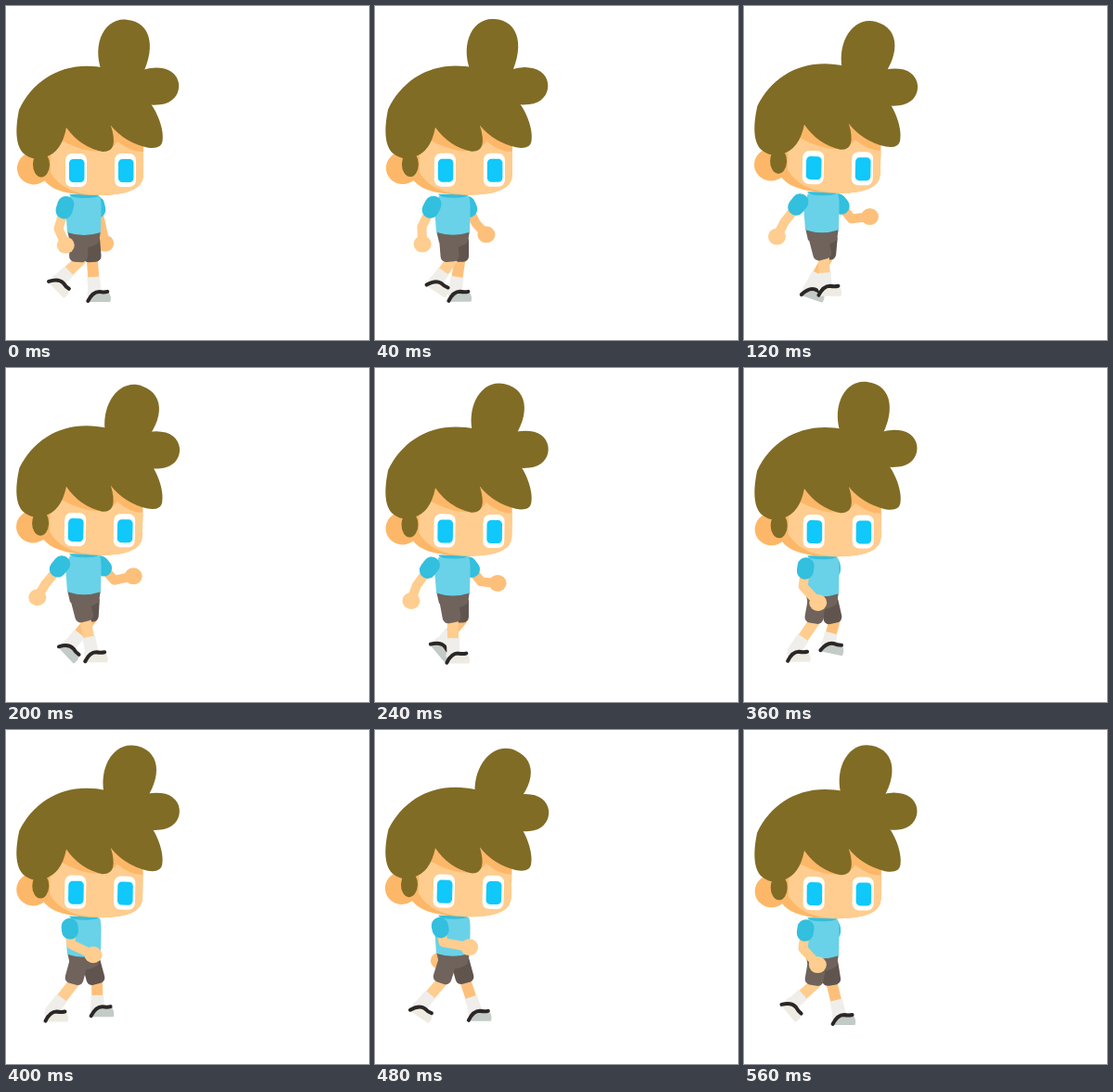
These frames come from a looping animation (391 px wide and 360 px high, 0.6 s). An HTML page with a canvas:

```html
<!DOCTYPE html>
<html>
<head>
<meta charset="utf-8">
<style>
  html, body { margin: 0; width: 100%; height: 100%; overflow: hidden; background: #fff; }
  canvas { display: block; }
</style>
</head>
<body>
<canvas id="stage" width="391" height="360"></canvas>
<script>
const ctx = document.getElementById('stage').getContext('2d');
const LOOP = 600, STEP = 40;

const HAIR = '#816c25', SKIN = '#fecd8f', SHADE = '#fdb768', FAR_SKIN = '#fdc07b';
const SHIRT = '#69d2e8', SLEEVE = '#33bfde', SOCK = '#efeeea', BLACK = '#2b2726';
const NEAR_SHORTS = '#6f635c', FAR_SHORTS = '#60544e';

const shape = {
  hair: new Path2D('M108 67C64 58 30 78 14 112C10 132 10 150 19 159Q30 168 42 163Q60 158 65 131Q80 152 104 157Q122 158 113 129Q128 147 152 152.5Q167 155 168.5 146C171 133 162 112 154 103L140 70Z'),
  tuft: new Path2D('M-18 0C-34 -28-24 -62 2 -62C30 -62 38 -32 20 4Z'),
  lobe: new Path2D('M130 76Q150 64 166 66C193 68 193 103 166 105.5Q155 107 148 104Z'),
  face: new Path2D('M40 150V186C48 199 68 204 100 204Q148 204 148 182V130H60Z'),
  light: new Path2D('M48 180V158Q49 147 62 146C85 158 110 162 120 146Q135 158 148 157V182Q148 204 100 204Q62 203 48 180Z'),
  shirt: new Path2D('M69 205H101Q103 210 102.5 222L102 244Q84 250 66 244L64 216Z'),
  collar: new Path2D('M68 203H101Q100 207 84 207Q70 207 68 203Z'),
  waist: new Path2D('M66 242H102L100 255Q85 266 69 255Z'),
  sole: new Path2D('M-10 6Q-5 -4 1 -4Q7 -3 11 -5Q15 1 13 6Z'),
  band: new Path2D('M-11 5Q-6 -5 1 -5Q6 -4 10 -5')
};

let phase = 0;

// Cosine of the walk cycle: peak in degrees, n cycles per loop
const wave = (peak, n = 1) => Math.cos(n * phase - peak * Math.PI / 180);
const mix = (a, b, k) => [a[0] + (b[0] - a[0]) * k, a[1] + (b[1] - a[1]) * k];

function fill(path, color) {
  ctx.fillStyle = color;
  ctx.fill(path);
}

function oval(x, y, rx, ry, color) {
  const path = new Path2D();
  path.ellipse(x, y, rx, ry, 0, 0, 7);
  fill(path, color);
}

function box(x, y, w, h, radius, color) {
  const path = new Path2D();
  path.roundRect(x, y, w, h, radius);
  fill(path, color);
}

function line(color, width, cap, ...points) {
  ctx.strokeStyle = color;
  ctx.lineWidth = width;
  ctx.lineCap = cap;
  ctx.lineJoin = 'round';
  ctx.beginPath();
  points.forEach(p => ctx.lineTo(...p));
  ctx.stroke();
}

function placed(x, y, degrees, draw) {
  ctx.save();
  ctx.translate(x, y);
  ctx.rotate(degrees * Math.PI / 180);
  draw();
  ctx.restore();
}

// The hand swings around its rest point and the elbow follows it
function drawArm(skin, shoulder, rest, swing, rise) {
  const hand = [rest[0] + swing, rest[1] - rise];
  const elbow = [rest[0] - 6 + swing * .46, rest[1] - 17 - Math.abs(swing) * .3];
  line(skin, 10, 'round', shoulder, elbow, hand);
  oval(...hand, 9.5, 9, skin);
  line(SLEEVE, 18, 'round', shoulder, mix(shoulder, elbow, .25));
}

function drawLeg(skin, cloth, soleColor, hip, knee, foot, turn) {
  const a = turn * Math.PI / 180, c = Math.cos(a), s = Math.sin(a);
  const ankle = [foot[0] - 4 * c + 6 * s, foot[1] - 4 * s - 6 * c];
  line(skin, 12, 'butt', mix(knee, ankle, -.2), mix(knee, ankle, .7));
  line(SOCK, 14, 'butt', mix(knee, ankle, .52), mix(knee, ankle, 1.1));
  placed(...foot, turn, () => {
    oval(-3, -3, 9, 7, SOCK);
    fill(shape.sole, soleColor);
    ctx.strokeStyle = BLACK;
    ctx.lineWidth = 4;
    ctx.lineCap = 'round';
    ctx.stroke(shape.band);
  });
  const dx = knee[0] - hip[0], dy = knee[1] - hip[1];
  placed(...hip, -Math.atan2(dx, dy) * 180 / Math.PI, () =>
    box(-10, 0, 20, Math.hypot(dx, dy), [3, 3, 6, 6], cloth));
}

function drawEye(x) {
  box(x, 159, 23, 36, 7, '#fff');
  box(x + 4, 165, 16.5, 25, 4.5, '#10c8fa');
}

function drawHead(bob) {
  const turn = 12 - 9 * wave(30, 2) - 2 * wave(90), sag = turn * .2;
  placed(80, 130 + bob, -bob * .45, () => {
    ctx.translate(-80, -130);
    oval(30, 175, 18, 17.5, SHADE);
    fill(shape.face, SHADE);
    fill(shape.light, SKIN);
    drawEye(64);
    drawEye(117);
    fill(shape.hair, HAIR);
    oval(38, 171, 9, 13.5, HAIR);
    placed(0, sag, 0, () => fill(shape.lobe, HAIR));
    placed(123, 75.5 + sag, turn, () => fill(shape.tuft, HAIR));
  });
}

function draw(t) {
  phase = t / LOOP * 2 * Math.PI;
  const bob = 1.7 * wave(12, 2) - 1.7;
  const swing = 3 - 35 * wave(97) - 4 * wave(0, 2);
  const kneeY = 276 + bob;

  ctx.fillStyle = '#fff';
  ctx.fillRect(0, 0, 391, 360);

  drawArm(FAR_SKIN, [97.5 - swing * .14, 214 + bob], [110, 254],
    -swing, -.6 * swing + .018 * swing ** 2);
  drawLeg(FAR_SKIN, FAR_SHORTS, '#c3cbc7', [91, 250 + bob],
    [93.5 - 5 * wave(85), kneeY],
    [90 - 22 * wave(115), 307 + 6 * wave(10)],
    50 * Math.max(0, wave(140)));
  placed(0, bob, 0, () => fill(shape.waist, NEAR_SHORTS));
  drawLeg(SKIN, NEAR_SHORTS, '#eeece2', [79, 250 + bob],
    [78.5 + 8 * wave(95), kneeY],
    [69 + 24 * wave(107) - 5 * wave(20, 2), 307 + 6 * wave(165)],
    50 * Math.max(0, wave(335)));
  placed(0, bob, 0, () => {
    fill(shape.shirt, SHIRT);
    fill(shape.collar, SLEEVE);
  });
  drawArm(SKIN, [64 + swing * .14, 214 + bob], [61, 258],
    swing, .0145 * swing ** 2);
  drawHead(bob);
}

function tick() {
  draw(Math.floor(performance.now() % LOOP / STEP) * STEP);
  requestAnimationFrame(tick);
}
tick();
</script>
</body>
</html>
```
